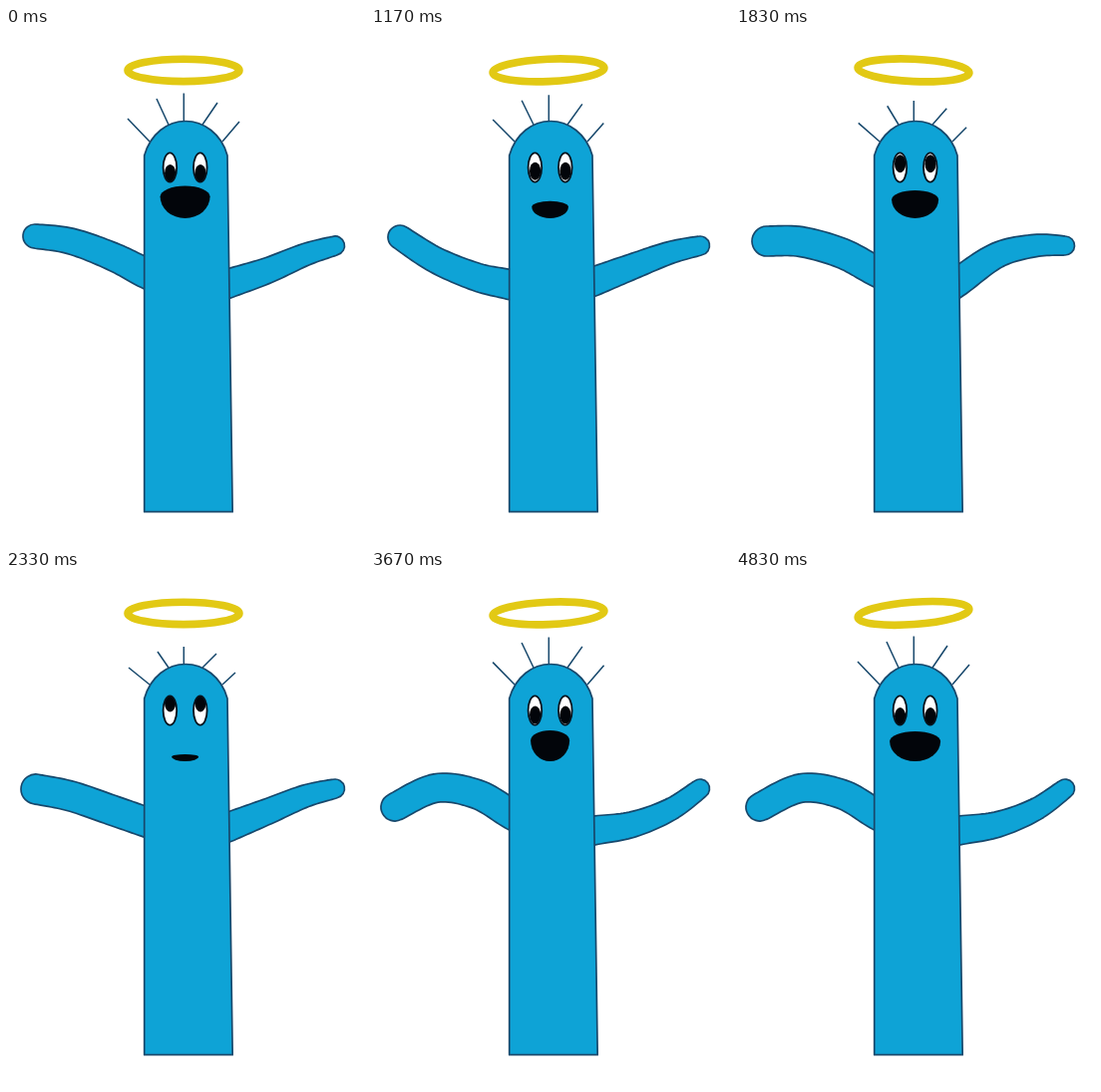
Recreate the animation shown at these times as an HTML page with a canvas. Size 360 by 517 pixels, loop 5 s.

```html
<!DOCTYPE html>
<html lang="en">
<head>
<meta charset="utf-8">
<title>Tube dancer</title>
<style>
html, body { margin: 0; width: 100%; height: 100%; overflow: hidden; background: #fff; }
canvas { display: block; width: 360px; height: 517px; }
</style>
</head>
<body>
<canvas id="stage"></canvas>
<script>
const W = 360, H = 517, LOOP = 5000, STEPS = 30;
const BLUE = '#0ea3d6', LINE = '#17486c', BLACK = '#02050a';

const canvas = document.getElementById('stage');
const ctx = canvas.getContext('2d');
const ratio = window.devicePixelRatio || 1;
canvas.width = W * ratio;
canvas.height = H * ratio;

// Key poses: step, then the values to blend. The last one is held.
// Left arm: heights of shoulder, elbow and wrist, then hand x, y and radius.
const leftKeys = [
  [0, 245.5, 229, 214, 29, 209, 12],
  [7, 257.5, 250, 233, 29, 210, 12],
  [11, 243.5, 226, 214.5, 31, 214, 15],
  [14, 251.5, 240, 226, 30, 219, 15],
  [18, 261, 256, 240, 27, 226, 15],
  [22, 243, 224, 218, 24, 237, 14]
];
// Right arm: heights of shoulder, elbow and wrist; its hand stays put.
const rightKeys = [
  [0, 256.5, 243.5, 227.5],
  [7, 254.5, 239.5, 225.5],
  [11, 254.5, 228, 218.5],
  [14, 257, 241.5, 226],
  [18, 260.5, 254.5, 239.5]
];
// Mouth: half width and top.
const mouthKeys = [
  [0, 25, 158.5], [7, 18.3, 173.7], [11, 23.5, 163], [14, 13.5, 184],
  [18, 22, 157], [22, 19.5, 160], [29, 25.5, 161]
];
// Halo tilt in degrees.
const haloKeys = [[0, 0], [7, -2.5], [11, 2.7], [14, 0], [18, -3], [22, -2.5], [29, -4.3]];

function sample(keys, step) {
  const i = keys.findLastIndex(key => key[0] <= step);
  const from = keys[i], to = keys[i + 1] || from;
  const p = (step - from[0]) / (to[0] - from[0] || 1);
  return from.slice(1).map((v, n) => v + (to[n + 1] - v) * p);
}

function paint(fill, stroke, width) {
  if (fill) {
    ctx.fillStyle = fill;
    ctx.fill();
  }
  if (stroke) {
    ctx.strokeStyle = stroke;
    ctx.lineWidth = width;
    ctx.stroke();
  }
}

function ellipse(x, y, rx, ry, turn = 0) {
  ctx.beginPath();
  ctx.ellipse(x, y, rx, ry, turn, 0, Math.PI * 2);
}

// Catmull-Rom position and heading between b and c.
function curve(a, b, c, d, t) {
  const axis = n => {
    const k1 = (c[n] - a[n]) / 2;
    const k2 = a[n] - 2.5 * b[n] + 2 * c[n] - d[n] / 2;
    const k3 = (d[n] - a[n]) / 2 + 1.5 * (b[n] - c[n]);
    return [b[n] + t * (k1 + t * (k2 + t * k3)), k1 + t * (2 * k2 + 3 * t * k3)];
  };
  const [x, dx] = axis(0), [y, dy] = axis(1);
  return { x, y, angle: Math.atan2(dy, dx) };
}

// Tapered tube along shoulder, elbow, wrist and hand, rooted inside the body.
function arm(shoulder, elbow, wrist, hand, thick, radius) {
  const rootX = 2 * shoulder[0] - elbow[0];
  const rootY = 2 * shoulder[1] - elbow[1];
  const joints = [[rootX, rootY], shoulder, elbow, wrist, hand];
  const at = i => joints[Math.max(0, Math.min(joints.length - 1, i))];
  const spine = [];
  for (let i = 0; i < 4; i++) {
    for (let n = 0; n < 12; n++) spine.push(curve(at(i - 1), at(i), at(i + 1), at(i + 2), n / 12));
  }
  const edge = side => spine.map((p, n) => {
    const half = thick + (radius - thick) * Math.max(0, (n - 12) / 36);
    return [p.x - side * half * Math.sin(p.angle), p.y + side * half * Math.cos(p.angle)];
  });

  ctx.beginPath();
  for (const p of edge(-1)) ctx.lineTo(...p);
  const end = spine[spine.length - 1].angle;
  ctx.arc(hand[0], hand[1], radius, end - Math.PI / 2, end + Math.PI / 2);
  for (const p of edge(1).reverse()) ctx.lineTo(...p);
  paint(BLUE, LINE, 1.7);
}

function arms(step) {
  const [ls, le, lw, x, y, r] = sample(leftKeys, step);
  arm([139, ls], [106, le], [65, lw], [x, y], 15, r);
  const [rs, re, rw] = sample(rightKeys, step);
  arm([223, rs], [262, re], [300, rw], [330, 218.5], 14.5, 9.5);
}

function body() {
  ctx.beginPath();
  ctx.moveTo(138.7, 485.7);
  ctx.lineTo(138.7, 128);
  ctx.bezierCurveTo(145, 106, 162, 93.5, 180, 93.5);
  ctx.bezierCurveTo(198, 93.5, 216, 106, 222, 128);
  ctx.lineTo(227.2, 485.7);
  ctx.closePath();
  paint(BLUE, LINE, 1.7);
}

// d runs from 0 (long) to 1 (short).
function hair(d) {
  const strands = [
    [144, 114, 122 + d, 91 + 6 * d],
    [163, 97, 151 + d, 71 + 10 * d],
    [178.3, 93, 178.3, 65.5 + 10.5 * d],
    [197, 97, 212 - d, 75 + 8 * d],
    [217, 114, 234 - 4 * d, 94 + 8 * d]
  ];
  ctx.beginPath();
  for (const [x1, y1, x2, y2] of strands) {
    ctx.moveTo(x1, y1);
    ctx.lineTo(x2, y2);
  }
  paint(null, LINE, 1.5);
}

function eye(x, pupilY) {
  ellipse(x, 140, 6.8, 14.6);
  ctx.save();
  ctx.clip();
  paint('#fff');
  ellipse(x + 0.2, pupilY, 5.6, 9);
  paint(BLACK);
  ctx.restore();
  ellipse(x, 140, 6.8, 14.6);
  paint(null, '#06121c', 1.8);
}

function mouth(half, top) {
  const x = 179.6, bottom = 191, corner = top + (bottom - top) / 3;
  ctx.beginPath();
  ctx.ellipse(x, corner, half, corner - top, 0, Math.PI, 0);
  ctx.ellipse(x, corner, half, bottom - corner, 0, 0, Math.PI);
  paint(BLACK);
}

function draw(step) {
  // Looking up peaks at step 14, and the hair shrinks with it.
  const lookUp = Math.exp(-(((step - 14) / 5.3) ** 2));
  const [tilt] = sample(haloKeys, step);

  ctx.setTransform(ratio, 0, 0, ratio, 0, 0);
  ctx.fillStyle = '#fff';
  ctx.fillRect(0, 0, W, H);
  ctx.lineJoin = 'round';

  ellipse(178, 42.4, 56, 11.2, tilt * Math.PI / 180);
  paint(null, '#e2c914', 7.6);
  hair(lookUp);
  arms(step);
  body();
  for (const x of [164.4, 194.8]) eye(x, 146 - 13.5 * lookUp);
  mouth(...sample(mouthKeys, step));
}

const start = performance.now();
function tick() {
  const t = (performance.now() - start) % LOOP;
  draw(Math.min(STEPS - 1, Math.floor((t + 4) * STEPS / LOOP)));
  requestAnimationFrame(tick);
}
tick();
</script>
</body>
</html>
```
